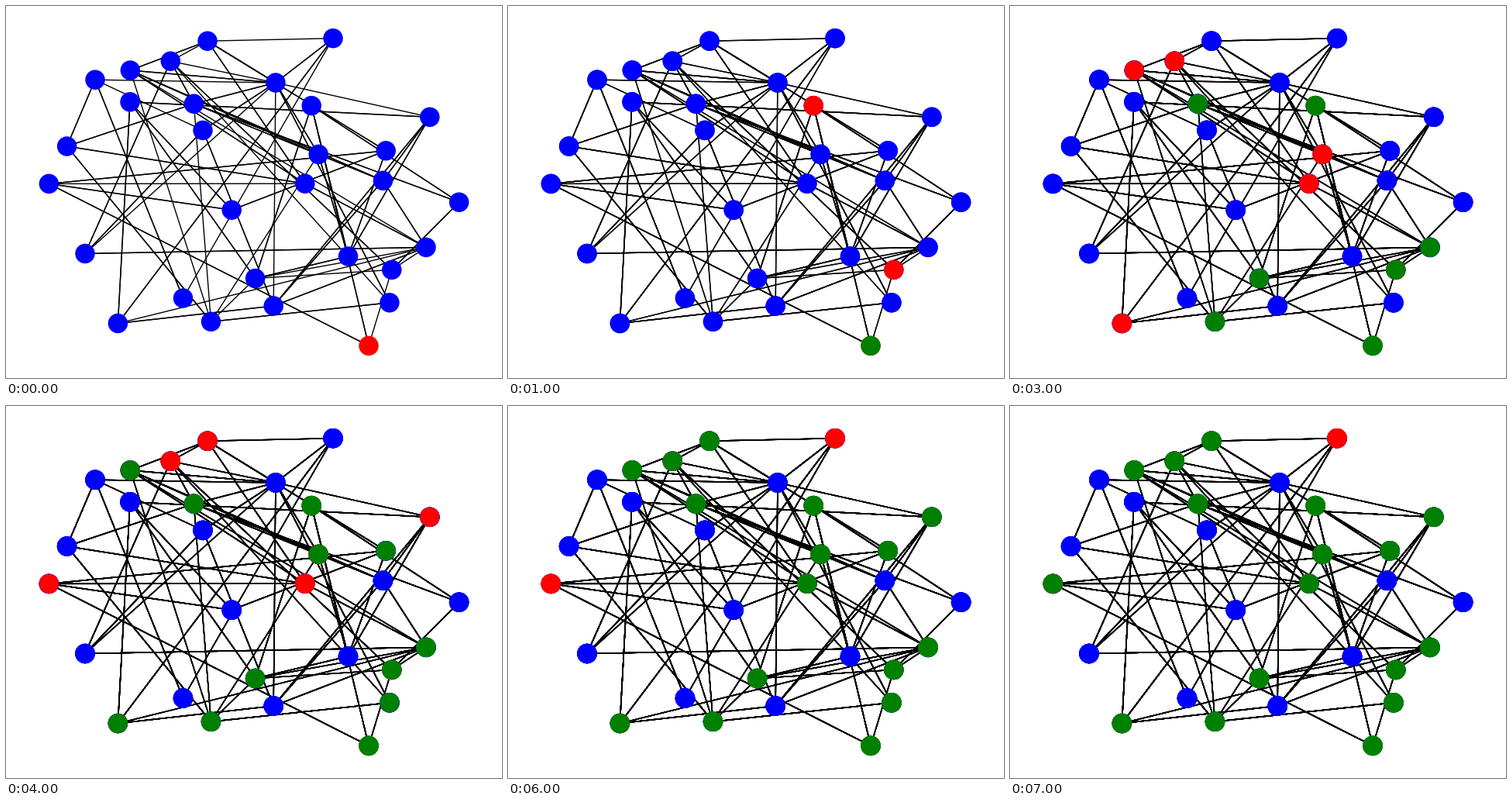
A matplotlib script that plays this animation: 640 by 480 pixels, repeating every 8000 ms.

```python
import matplotlib.pyplot as plt
from matplotlib.animation import FuncAnimation
from matplotlib.collections import LineCollection

W, H, DPI = 640, 480, 100
STEPS = 8

NODES = {
    "A": (260, 45.2), "B": (422, 41.7), "C": (212.3, 71.2), "D": (160.3, 83),
    "E": (115, 95.2), "F": (160, 123.8), "G": (242.4, 126.2), "H": (254, 160.4),
    "I": (347.9, 99), "J": (394.2, 128.6), "K": (546.8, 143.3), "L": (78.6, 181),
    "M": (403.2, 191.4), "N": (490.2, 186.8), "O": (486.4, 225.3),
    "P": (55.4, 229.4), "Q": (385.8, 229.2), "R": (584.6, 253.2),
    "S": (291.2, 263.2), "T": (102, 319.5), "U": (441.5, 323), "V": (542, 311.4),
    "W": (497.8, 340.4), "X": (321.6, 351.5), "Y": (345.2, 387),
    "Z": (494.9, 382.8), "a": (228.5, 377), "b": (144.4, 409.5),
    "c": (264.5, 407.3), "d": (468, 438.4),
}

# Mutual contacts are drawn twice per step, one-way contacts once.
MUTUAL = ("AD AI AN AQ BI Bb DI DM DO DQ EL Ea FK FS FX Fb GI GO GR GC HI HY "
          "IM IZ JR JX Jd JU KO KU KY LG LQ Lc MU PN PS Pd SN TC TH TV "
          "CW QV XU bY YV cZ RW OV OY NU").split()
ONE_WAY = ("AB AC CI EI EH IK IY DV Dc Gc CZ Ba PQ Mc Xc XV XW bV WV "
           "Wd TI").split()

# Step of infection and step of recovery for each node that falls ill.
COURSE = {
    "d": (0, 1), "J": (1, 2), "W": (1, 3), "M": (2, 4), "D": (3, 4),
    "C": (3, 5), "Q": (3, 5), "b": (3, 4), "G": (3, 3), "X": (3, 3),
    "c": (3, 3), "V": (3, 3), "A": (4, 5), "K": (4, 5), "N": (4, 4),
    "Z": (4, 4), "P": (4, 7), "B": (5, STEPS),
}


def color(name, step):
    sick, well = COURSE.get(name, (STEPS, STEPS))
    if step >= well:
        return "green"
    return "red" if step >= sick else "blue"


def segments(pairs):
    return [[NODES[p], NODES[q]] for p, q in pairs]


fig = plt.figure(figsize=(W / DPI, H / DPI), dpi=DPI, facecolor="white")
ax = fig.add_axes([0, 0, 1, 1])
ax.set_xlim(0, W)
ax.set_ylim(H, 0)
ax.axis("off")

lines = segments(MUTUAL * 2 + ONE_WAY)
xs, ys = zip(*NODES.values())
layers = []
for step in range(STEPS):
    edges = LineCollection(lines, colors="black", linewidths=1, zorder=1)
    ax.add_collection(edges, autolim=False)
    dots = ax.scatter(xs, ys, s=300, linewidths=1, zorder=2,
                      c=[color(n, step) for n in NODES])
    layers.append((edges, dots))


def draw(step):
    """Each step paints over the earlier ones, so thin strokes build up."""
    for i, layer in enumerate(layers):
        for artist in layer:
            artist.set_visible(i <= step)
    return [artist for layer in layers for artist in layer]


anim = FuncAnimation(fig, draw, frames=STEPS, interval=1000,
                     init_func=lambda: draw(0), repeat=True, repeat_delay=0)
plt.show()
```
